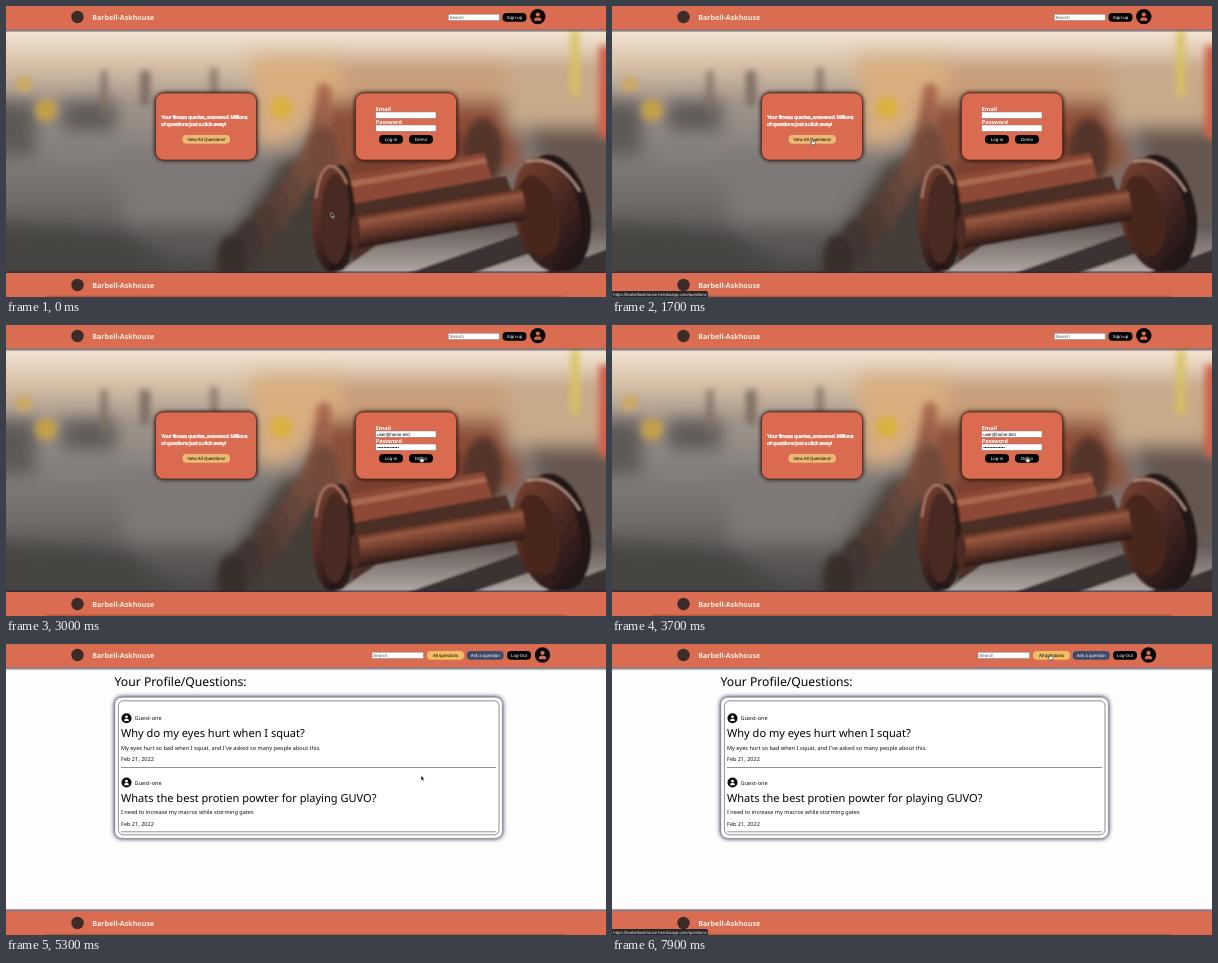
These frames come from a looping animation (600 by 291 pixels, 8 s). An HTML page:

```html
<!DOCTYPE html>
<html lang="en">
<head>
<meta charset="utf-8">
<title>Gym questions</title>
<style>
  html, body { margin: 0; width: 100%; height: 100%; overflow: hidden; background: #fdfdfe; }
  svg { display: block; width: 100%; height: 100%; }
  text { text-rendering: geometricPrecision; white-space: pre; }
  .ui { font: 4.45px "Liberation Sans", Arial, sans-serif; }
  .mid { text-anchor: middle; }
  .brand { font: 700 7.1px "Noto Sans", sans-serif; fill: #fdeee2; }
  .label { font: 700 5.5px "Noto Sans", sans-serif; fill: #fff; }
  .pitch { font: 700 5.4px "Liberation Sans", Arial, sans-serif; letter-spacing: -.4px; fill: #fff; stroke: #fff; stroke-width: .2; }
  .page { font: 5.55px "Noto Sans", sans-serif; fill: #111; }
  .title { font-size: 11.05px; fill: #000; }
  .heading { font-size: 12.2px; fill: #000; }
  .link { font: 4.25px "Liberation Sans", Arial, sans-serif; fill: #e8e8e8; }
  .white { fill: #fff; }
  .hint { fill: #555; }
  .input { fill: #fff; stroke: #8b7d78; stroke-width: .5; }
</style>
</head>
<body>
<svg viewBox="0 0 600 291" preserveAspectRatio="none">
  <defs>
    <linearGradient id="room" x2="0" y2="1">
      <stop offset="0" stop-color="#f3e6d6"/>
      <stop offset=".15" stop-color="#d6bfa6"/>
      <stop offset=".3" stop-color="#a3968c"/>
      <stop offset=".5" stop-color="#85807d"/>
      <stop offset=".75" stop-color="#6a6664"/>
      <stop offset="1" stop-color="#4b4847"/>
    </linearGradient>
    <linearGradient id="bar" x2="0" y2="1">
      <stop offset="0" stop-color="#5c3023"/>
      <stop offset=".2" stop-color="#97583f"/>
      <stop offset=".55" stop-color="#6b392a"/>
      <stop offset="1" stop-color="#2a1917"/>
    </linearGradient>
    <linearGradient id="plate" x2=".5" y2="1">
      <stop offset="0" stop-color="#7b4533"/>
      <stop offset=".45" stop-color="#5a3026"/>
      <stop offset="1" stop-color="#241718"/>
    </linearGradient>
    <linearGradient id="bench" x2="0" y2="1">
      <stop offset="0" stop-color="#4a403d"/>
      <stop offset="1" stop-color="#b3aaa5"/>
    </linearGradient>
    <filter id="soft" x="-50%" y="-50%" width="200%" height="200%"><feGaussianBlur stdDeviation="9"/></filter>
    <filter id="haze" x="-50%" y="-50%" width="200%" height="200%"><feGaussianBlur stdDeviation="3.5"/></filter>
    <filter id="edge" x="-20%" y="-20%" width="140%" height="140%"><feGaussianBlur stdDeviation=".8"/></filter>
    <filter id="glow" x="-20%" y="-20%" width="140%" height="140%"><feGaussianBlur stdDeviation="2.2"/></filter>
    <clipPath id="view"><rect y="23" width="600" height="245"/></clipPath>
    <g id="person">
      <circle r="7.7" fill="#080808"/>
      <circle cy="-2.1" r="2.1"/>
      <path d="M-3.7 4.2Q-3.7.8-1.2.8H1.2Q3.7.8 3.7 4.2Z"/>
    </g>
    <g id="card">
      <rect x="-.5" y="-.5" width="102" height="68" rx="9" fill="#1c0f0b" filter="url(#glow)"/>
      <rect width="101" height="67" rx="8" fill="#da6b50" stroke="#4a241b" stroke-width=".7"/>
    </g>
  </defs>

  <g id="login">
    <g clip-path="url(#view)">
      <rect y="23" width="600" height="245" fill="url(#room)"/>
      <g filter="url(#soft)">
        <path d="M-30 95H30V150H-30ZM55 95H110V125H55Z" fill="#5d5957"/>
        <path d="M-30 215L120 225L200 290H-30Z" fill="#464443"/>
        <path d="M110 150H260L230 215H120Z" fill="#7e7977"/>
        <path d="M245 50H335V95L280 140H250Z" fill="#d9ae80"/>
        <path d="M335 55H500V100H335Z" fill="#c99f7c"/>
        <path d="M310 95H500L520 165H320Z" fill="#8c4f38"/>
        <path d="M500 55H630V120H500Z" fill="#c7aa8a"/>
        <path d="M520 120H630V215H560Z" fill="#65574f"/>
        <path d="M280 150L330 165L320 290H195Z" fill="#453c39"/>
      </g>
      <path d="M-20 42H620" stroke="#fff" stroke-width="25" stroke-linecap="round" stroke-dasharray="58 33 24 30" filter="url(#haze)"/>
      <path d="M0 34H600" stroke="#fffaf0" stroke-width="9" opacity=".7" filter="url(#haze)"/>
      <g filter="url(#haze)">
        <circle cx="275" cy="102" r="11" fill="#d9b13c"/>
        <circle cx="40" cy="104" r="11" fill="#c2a04a"/>
        <circle cx="18" cy="78" r="8" fill="#cdaa62"/>
        <path d="M95 65H101V110H95ZM134 65H144V100H134ZM205 62H211V90H205Z" fill="#7d6d62"/>
        <path d="M565 24H573V90H565Z" fill="#d9c25c"/>
        <path d="M593 40H605V132H593Z" fill="#cf5f4c"/>
      </g>
      <g id="rack" filter="url(#haze)"></g>
      <g filter="url(#haze)">
        <path d="M340 155L455 125L462 150L345 185Z" fill="#7c3f2d"/>
        <ellipse cx="477" cy="146" rx="20" ry="34" fill="#55352b"/>
        <ellipse cx="318" cy="152" rx="15" ry="32" fill="#74483a"/>
      </g>
      <g filter="url(#edge)">
        <path d="M340 170L478 147L486 172L345 205Z" fill="#8d4a34"/>
        <path d="M340 176L480 152L481 157L341 182Z" fill="#aa6850"/>
        <path d="M335 200L500 170L520 225L350 268Z" fill="#4b2d25"/>
        <path d="M330 268L370 240L560 205L610 225V268Z" fill="url(#bench)"/>
        <path d="M400 268L520 226L545 240L465 268ZM535 268L610 240V268Z" fill="#3a3130"/>
        <g transform="rotate(-12 545 208)">
          <ellipse cx="551" cy="208" rx="33" ry="59" fill="#241718"/>
          <ellipse cx="541" cy="208" rx="33" ry="58" fill="url(#plate)"/>
          <ellipse cx="532" cy="207" rx="20" ry="41" fill="#4a281f"/>
          <path d="M532 152Q563 150 578 192" fill="none" stroke="#b89a8c" stroke-width="2"/>
        </g>
        <rect x="340" y="197" width="180" height="32" rx="4" fill="url(#bar)" transform="rotate(-9.5 430 213)"/>
        <ellipse cx="334" cy="212" rx="15" ry="53" fill="#2c1a17"/>
        <ellipse cx="325" cy="212" rx="19" ry="54" fill="url(#plate)"/>
        <ellipse cx="329" cy="213" rx="14" ry="45" fill="#482920"/>
        <path d="M310 192Q313 163 324 160Q334 160 341 178" fill="none" stroke="#b4816d" stroke-width="2"/>
        <ellipse cx="349" cy="226" rx="5" ry="17" fill="#4d2a20"/>
      </g>
    </g>
    <use href="#card" x="149.5" y="87"/>
    <text class="pitch" x="155" y="113">Your fitness queries, answered. Millions</text>
    <text class="pitch" x="155" y="119.5">of questions just a click away!</text>
    <rect x="176.5" y="129" width="47.5" height="8.7" rx="4" fill="#edb873"/>
    <text class="ui mid" x="200.2" y="135">View All Questions!</text>
    <use href="#card" x="349.5" y="87"/>
    <text class="label" x="369.7" y="104.8">Email</text>
    <rect class="input" x="369.8" y="106" width="60.2" height="6.3"/>
    <text class="label" x="369.7" y="117.8">Password</text>
    <rect class="input" x="369.8" y="119" width="60.2" height="6.3"/>
    <g id="filled">
      <text class="ui" x="371.2" y="110.8">user@home.test</text>
      <text class="ui" x="371.2" y="123.8">••••••••••••••</text>
    </g>
    <rect x="373" y="129" width="24" height="8.7" rx="4"/>
    <text class="ui mid white" x="385" y="135">Log-in</text>
    <rect x="403" y="129" width="24" height="8.7" rx="4"/>
    <text class="ui mid white" x="415" y="135">Demo</text>
  </g>

  <g id="profile">
    <rect width="600" height="291" fill="#fdfdfe"/>
    <text class="page heading" x="108.5" y="42">Your Profile/Questions:</text>
    <rect x="108" y="52.5" width="389" height="142.5" rx="8" fill="#33334f" filter="url(#glow)"/>
    <rect x="108.8" y="53.2" width="387.6" height="141.2" rx="7" fill="#fff" stroke="#77778a" stroke-width=".6"/>
    <rect x="112.4" y="56.8" width="380.6" height="134" rx="5" fill="#fff" stroke="#74747c" stroke-width=".8"/>
    <g id="posts"></g>
  </g>

  <rect x="-6" y="20" width="612" height="4.5" fill="#25203a" filter="url(#glow)"/>
  <rect x="-6" y="266" width="612" height="5" fill="#25203a" filter="url(#glow)"/>
  <rect width="600" height="23.5" fill="#da6c51"/>
  <rect y="267" width="600" height="24" fill="#da6c51"/>
  <rect x="40" y="290.5" width="520" height="4" fill="#5a2318" opacity=".5" filter="url(#edge)"/>
  <g fill="#3c2b29"><circle cx="71.5" cy="11" r="6.2"/><circle cx="71.5" cy="279" r="6.2"/></g>
  <text class="brand" x="86.3" y="13.6">Barbell-Askhouse</text>
  <text class="brand" x="86.3" y="281.8">Barbell-Askhouse</text>

  <g id="guestNav">
    <rect class="input" x="442.3" y="8.2" width="51" height="6.3"/>
    <text class="ui hint" x="443.6" y="13">Search</text>
    <rect x="496.5" y="7" width="24" height="8.7" rx="4"/>
    <text class="ui mid white" x="508.5" y="13">Sign-up</text>
    <use href="#person" x="531.8" y="10.6" fill="#da6c51"/>
  </g>
  <g id="userNav">
    <rect class="input" x="366" y="8.2" width="51.5" height="6.3"/>
    <text class="ui hint" x="367.3" y="13">Search</text>
    <rect x="421" y="7" width="37" height="8.7" rx="4" fill="#f0bd62"/>
    <text class="ui mid" x="439.5" y="13">All questions</text>
    <rect x="460.7" y="7" width="37" height="8.7" rx="4" fill="#3f4c68"/>
    <text class="ui mid white" x="479.2" y="13">Ask a question</text>
    <rect x="501" y="7" width="24" height="8.7" rx="4"/>
    <text class="ui mid white" x="513" y="13">Log-Out</text>
    <use href="#person" x="536.5" y="11" fill="#da6c51"/>
  </g>

  <g id="status">
    <path d="M0 285H94Q96 285 96 287V291H0Z" fill="#27272a"/>
    <text class="link" x="1.3" y="289.7">https://barbellaskhouse.herokuapp.com/questions</text>
  </g>

  <g id="cursor" stroke-linejoin="round">
    <path id="arrow" d="M0 0V5L1.2 4L2 5.9L2.9 5.5L2.1 3.7H3.6Z" fill="#000" stroke="#fff" stroke-width=".5"/>
    <path id="hand" d="M-.6.5Q0-.3.6.5V2.3L2.7 2.8Q3.2 3 3.1 3.7L2.6 5.8H-.4L-2 3.7Q-1.6 2.9-.6 3.7Z" fill="#fff" stroke="#111" stroke-width=".5"/>
  </g>
</svg>
<script>
const LOOP = 8000, STEP = 100, SIGNED_IN = 5200, FILLED = 2900;
const $ = id => document.getElementById(id);

// time, x, y of the pointer tip
const path = [
  [0, 325, 206.5], [300, 325, 206.5], [500, 322, 203], [600, 322, 203],
  [1400, 200.5, 133], [2300, 200.5, 133], [2900, 415, 131.5],
  [6000, 415, 131.5], [6800, 439, 11], [7900, 438, 10]
];
const linkTimes = [[1400, 2500], [6800, LOOP]];

const posts = [
  ["Why do my eyes hurt when I squat?",
   "My eyes hurt so bad when I squat, and I've asked so many people about this."],
  ["Whats the best protien powter for playing GUVO?",
   "I need to increase my macros while storming gates"]
];
$("posts").innerHTML = posts.map(([title, body], i) => `
  <g transform="translate(115 ${64.3 * i})">
    <use href="#person" transform="translate(5.5 74.2) scale(.65)" fill="#fff"/>
    <text class="page" x="13.6" y="76.3">Guest-one</text>
    <text class="page title" y="93.3">${title}</text>
    <text class="page" y="105.8">${body}</text>
    <text class="page" y="117.4">Feb 21, 2022</text>
    <path d="M0 123.5H375" stroke="#77777c" stroke-width=".8"/>
  </g>`).join("");

// blurred weights receding into the room, warmer and smaller towards the back
$("rack").innerHTML = Array.from({ length: 11 }, (_, i) => {
  const near = i / 10;
  const fill = `rgb(${170 - 115 * near} ${105 - 58 * near} ${80 - 36 * near})`;
  return `<ellipse cx="${318 - 92 * near * near}" cy="${88 + 165 * near}" rx="${8 + 7 * near}" ry="${11 + 14 * near}" fill="${fill}"/>`;
}).join("");

const show = (id, on) => $(id).setAttribute("visibility", on ? "visible" : "hidden");
const smooth = u => u * u * (3 - 2 * u);

function pointer(t) {
  const i = path.findIndex(k => k[0] > t);
  if (i < 0) return path[path.length - 1].slice(1);
  const [t0, x0, y0] = path[i - 1], [t1, x1, y1] = path[i];
  const u = smooth((t - t0) / (t1 - t0));
  return [x0 + (x1 - x0) * u, y0 + (y1 - y0) * u];
}

function hovers(x, y, signedIn) {
  const row = top => y >= top && y <= top + 9;
  const span = (a, b) => x >= a && x <= b;
  return signedIn
    ? row(7) && span(421, 525)
    : row(129) && (span(176, 224) || span(373, 397) || span(403, 427));
}

function draw(now) {
  const t = Math.floor(now % LOOP / STEP) * STEP;
  const signedIn = t >= SIGNED_IN;
  const [x, y] = pointer(t);
  const hand = hovers(x, y, signedIn);
  show("login", !signedIn);
  show("guestNav", !signedIn);
  show("profile", signedIn);
  show("userNav", signedIn);
  show("filled", t >= FILLED && !signedIn);
  show("status", linkTimes.some(([a, b]) => t >= a && t < b));
  show("hand", hand);
  show("arrow", !hand);
  $("cursor").setAttribute("transform", `translate(${x} ${y})`);
}

const start = performance.now();
function tick() {
  draw(performance.now() - start);
  requestAnimationFrame(tick);
}
tick();
</script>
</body>
</html>
```
